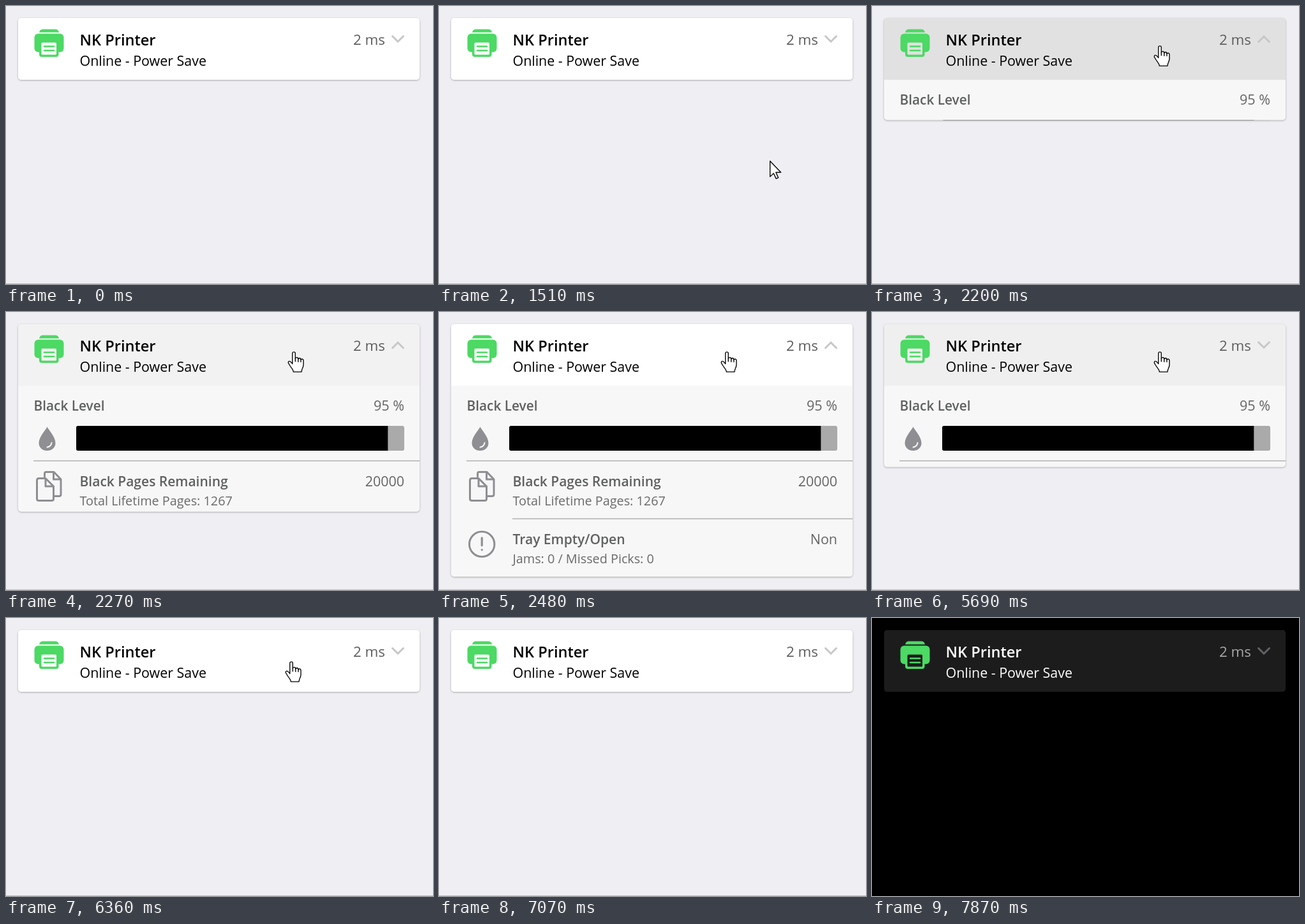
An HTML page with a canvas that plays this animation: 669x437 px, repeating every 8000 ms.

```html
<!DOCTYPE html>
<html lang="en">
<head>
<meta charset="utf-8">
<title>Printer status card</title>
<style>
  html, body { margin: 0; width: 100%; height: 100%; overflow: hidden; background: #efeef3; }
  canvas { display: block; width: 669px; height: 437px; }
</style>
</head>
<body>
<canvas id="stage" width="669" height="437"></canvas>
<script>
const W = 669, H = 437, LOOP = 8000, TICK = 66.6;
const ctx = document.getElementById('stage').getContext('2d');
const FONT = '"Open Sans", "Noto Sans", sans-serif';
const GREEN = '#4cd964', ICON = '#8e8e93';

const light = { bg: '#efeef3', text: '#000', after: '#5c5c5c', chevron: '#c7c7c9' };
const dark = { bg: '#000', text: '#fff', after: '#a9a9a9', chevron: '#636366' };

const BURSTS = [0, 920, 1790, 5490, 6360, 7070];
const OPEN = { press: 2050, release: 2141 };
const CLOSE = { press: 5490, release: 5590 };
const SLIDE = 300, DARK_AT = 7870, HEAD_BOTTOM = 116, BODY = 300;

// Pointer tip: time, x, y
const ENTER = [[920, 600, 425], [1120, 572, 366], [1320, 540, 292], [1520, 507, 218],
  [1720, 467, 122], [1790, 459, 96], [1920, 453, 70], [2050, 451, 62]];
const LEAVE = [[6300, 451, 62], [6360, 447, 68], [6430, 440, 84], [6495, 433, 106], [6560, 425, 130],
  [6700, 424, 185], [6830, 442, 262], [6930, 472, 334], [7000, 508, 388], [7060, 548, 428]];

const clamp = v => Math.min(1, Math.max(0, v));

function snap(t) {
  const start = BURSTS.filter(b => b <= t).pop();
  return start + Math.floor((t - start) / TICK) * TICK;
}

// CSS "ease": cubic-bezier(.25, .1, .25, 1)
function ease(x) {
  if (x <= 0 || x >= 1) return clamp(x);
  let lo = 0, hi = 1, s;
  for (let i = 0; i < 24; i++) {
    s = (lo + hi) / 2;
    if (0.75 * s * (1 - s) + s ** 3 < x) lo = s; else hi = s;
  }
  return 0.3 * (1 - s) ** 2 * s + 3 * (1 - s) * s * s + s ** 3;
}

const slide = (t, click) => ease((t - click.release) / SLIDE);

function along(keys, t) {
  const i = keys.findIndex(k => k[0] > t);
  if (i < 0) return keys[keys.length - 1].slice(1);
  if (i === 0) return keys[0].slice(1);
  const [t0, x0, y0] = keys[i - 1], [t1, x1, y1] = keys[i];
  const p = (t - t0) / (t1 - t0);
  return [x0 + (x1 - x0) * p, y0 + (y1 - y0) * p];
}

function headColor(t) {
  const click = t >= CLOSE.press ? CLOSE : OPEN;
  if (t < click.press) return '#fff';
  const v = Math.round(217 + 38 * slide(t, click));
  return `rgb(${v},${v},${v})`;
}

function rect(x, y, w, h, color) {
  ctx.fillStyle = color;
  ctx.fillRect(x, y, w, h);
}

function round(x, y, w, h, r, color) {
  ctx.beginPath();
  ctx.roundRect(x, y, w, h, r);
  ctx.fillStyle = color;
  ctx.fill();
}

function stroke(d, color, width) {
  ctx.strokeStyle = color;
  ctx.lineWidth = width;
  ctx.stroke(new Path2D(d));
}

function fill(d, color) {
  ctx.fillStyle = color;
  ctx.fill(new Path2D(d));
}

function text(str, x, y, size, color, weight = 400, align = 'left') {
  ctx.font = `${weight} ${size}px ${FONT}`;
  ctx.textAlign = align;
  ctx.fillStyle = color;
  ctx.fillText(str, x, y);
}

function printer(paper) {
  fill('M52 41.5 Q53 36.5 58 36.5 H77 Q82 36.5 83 41.5 Z', GREEN);
  round(44.5, 43.5, 46, 29, 6, GREEN);
  round(52, 55, 30.5, 25, 4, GREEN);
  round(55.5, 57.5, 23.5, 19, 1.5, paper);
  stroke('M60 63.5 H75 M60 70 H75', GREEN, 2.6);
}

function header(theme, color, open) {
  rect(19, 19, 629, HEAD_BOTTOM - 19, color);
  printer(color);
  text('NK Printer', 115.5, 62, 23.6, theme.text, 600);
  text('Online - Power Save', 115.5, 94, 21.4, theme.text);
  text('2 ms', 594, 61, 22.3, theme.after, 400, 'right');
  ctx.lineJoin = 'miter';
  stroke(open ? 'M605.5 56.5 L614 48 L622.5 56.5' : 'M605.5 47.5 L614 56 L622.5 47.5', theme.chevron, 3);
  ctx.lineJoin = 'round';
}

function drop() {
  fill('M64.5 180.5 C66.5 185 77.5 196 77.5 206 C77.5 213.5 71.5 218 64.5 218 ' +
    'C57.5 218 51.5 213.5 51.5 206 C51.5 196 62.5 185 64.5 180.5 Z', ICON);
  stroke('M71.5 205.5 Q70.5 211.5 64.5 212.5', '#f7f7f7', 2);
}

function pages() {
  stroke('M60.5 259 V254 Q60.5 251.5 63 251.5 H75 L86 263 V286.5 Q86 289.5 83 289.5 H76 M74.5 252 V263 H86', ICON, 3);
  stroke('M51.5 261.5 H62 L74.5 274 V293.5 Q74.5 296.5 71.5 296.5 H51.5 Q48.5 296.5 48.5 293.5 V264.5 ' +
    'Q48.5 261.5 51.5 261.5 Z M62 262 V274 H74', ICON, 3);
}

function alertMark() {
  stroke('M47.5 365 a19.7 19.7 0 1 1 39.4 0 a19.7 19.7 0 1 1 -39.4 0', ICON, 3);
  stroke('M67.2 355 V367 M67.2 373.8 V374', ICON, 3.2);
}

function row(y, title, value, note) {
  text(title, 115.5, y, 21, '#5f6060', 600);
  text(value, 624, y, 21.4, '#656565', 400, 'right');
  text(note, 115.5, y + 30, 19.8, '#6a6a6a');
}

function details() {
  rect(19, HEAD_BOTTOM, 629, BODY, '#f7f7f7');
  text('Black Level', 43.5, 155, 20.8, '#5f6060', 600);
  text('95 %', 624, 155, 21.6, '#656565', 400, 'right');
  drop();
  round(110, 179, 514, 39, 3, '#aaa');
  round(110, 179, 514 * 0.95, 39, [3, 0, 0, 3], '#000');
  rect(43, 233, 605, 2, '#c2c2c4');
  pages();
  row(274, 'Black Pages Remaining', '20000', 'Total Lifetime Pages: 1267');
  rect(115, 324, 533, 2, '#c2c2c4');
  alertMark();
  row(365, 'Tray Empty/Open', 'Non', 'Jams: 0 / Missed Picks: 0');
}

const ARROW = 'M0.4 0.6 V17 L4.1 13.4 L6.7 19 L9 18 L6.5 12.4 H11.7 Z';
const HAND = 'M5 13 V2 Q5 .6 6.5 .6 Q8 .6 8 2 V7.5 Q8.2 6.2 9.5 6.2 Q11 6.3 11 8 Q11.2 7 12.4 7 ' +
  'Q13.8 7.1 13.8 8.8 Q14.1 7.9 15 7.9 Q16.5 8 16.5 9.8 V14 C16.5 17 14.5 18 14.5 21.4 H6 ' +
  'C6 19 3.5 17 2.5 15 L.8 12.2 Q.3 10.6 1.6 10.3 Q3 10.2 5 13 Z';

function pointer(x, y) {
  const hand = y < HEAD_BOTTOM;
  const d = hand ? HAND : ARROW;
  ctx.save();
  ctx.translate(hand ? x - 9.75 : x, y);
  ctx.scale(1.5, 1.5);
  fill(d, '#fff');
  stroke(d, '#000', 0.9);
  if (hand) stroke('M8 7.5 V10.5 M11 8 V10.8 M13.8 8.8 V11', '#000', 0.9);
  ctx.restore();
}

function card(theme, color, height, open, shadow) {
  ctx.save();
  if (shadow) {
    ctx.shadowColor = 'rgba(0,0,0,.3)';
    ctx.shadowBlur = 3;
    ctx.shadowOffsetY = 1;
  }
  round(19, 19, 629, 97 + height, 5, color);
  ctx.restore();
  ctx.save();
  ctx.beginPath();
  ctx.roundRect(19, 19, 629, 97 + height, 5);
  ctx.clip();
  if (height > 0) details();
  header(theme, color, open);
  ctx.restore();
}

function draw(time) {
  const t = snap(time);
  const isDark = time >= DARK_AT;
  const theme = isDark ? dark : light;
  rect(0, 0, W, H, theme.bg);
  if (isDark) {
    card(theme, '#1c1c1d', 0, false, false);
    return;
  }
  rect(0, 436, W, 1, '#bdbcc4');
  const height = BODY * (slide(t, OPEN) - slide(t, CLOSE));
  const open = t >= OPEN.release && t < CLOSE.release;
  card(theme, headColor(t), height, open, true);
  if (time >= 920 && time < 7070) pointer(...along(t < 6300 ? ENTER : LEAVE, t));
}

ctx.lineCap = 'round';
ctx.lineJoin = 'round';
const began = performance.now();
function frame() {
  draw((performance.now() - began) % LOOP);
  requestAnimationFrame(frame);
}
frame();
</script>
</body>
</html>
```
